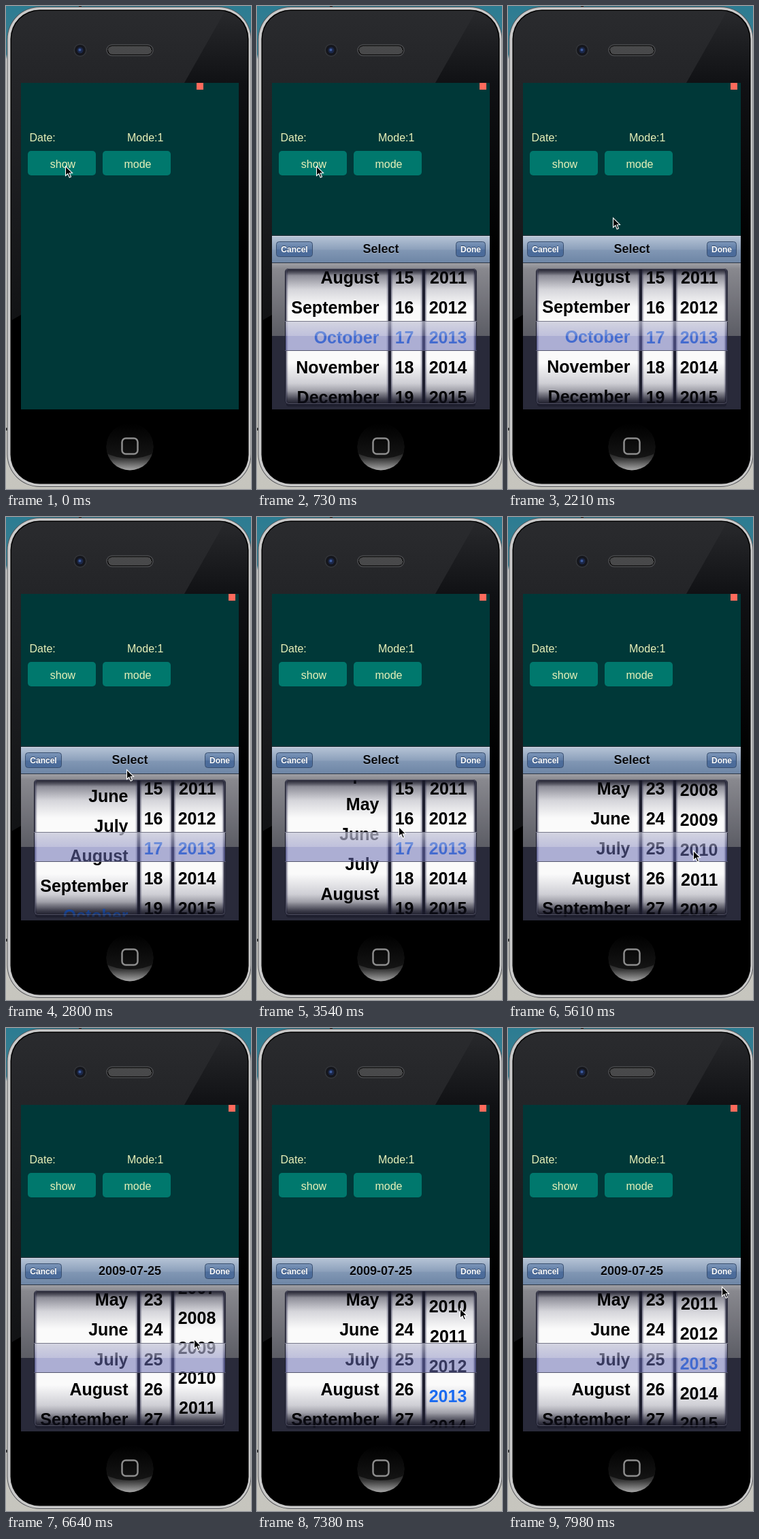
An HTML page with a canvas for the animation above (8 s loop, 360 by 710 pixels).

```html
<!DOCTYPE html>
<html>
<head>
<meta charset="utf-8">
<style>
html, body { margin: 0; width: 100%; height: 100%; overflow: hidden; background: #000; }
canvas { display: block; }
</style>
</head>
<body>
<canvas id="stage" width="360" height="710"></canvas>
<script>
const c = document.getElementById('stage').getContext('2d');
const LOOP = 8000, TICK = 147.6, LEAD = 16, ROW = 44, BASELINE = 495.5;
const SANS = '"Liberation Sans", Arial, sans-serif';
const MONTHS = ['January', 'February', 'March', 'April', 'May', 'June', 'July',
  'August', 'September', 'October', 'November', 'December'];

// Resting points of the pointer: [tick, x, y].
const stops = [[6, 87, 235], [11, 145, 440], [15, 154, 311], [24, 208, 455], [29, 218, 347],
  [31, 239, 444], [38, 272, 490], [43, 275, 465], [45, 276, 457], [54, 314, 380]];

function pointerAt(tick) {
  const i = stops.findIndex(s => s[0] > tick);
  if (i === 0) return stops[0].slice(1);
  if (i < 0) return stops[stops.length - 1].slice(1);
  const [t0, x0, y0] = stops[i - 1], [t1, x1, y1] = stops[i];
  const p = (tick - t0) / (t1 - t0), e = p * p * (3 - 2 * p);
  return [x0 + (x1 - x0) * e, y0 + (y1 - y0) * e];
}

// Fast start that coasts to rest.
function flick(tick, start, end, distance) {
  const p = Math.min(1, Math.max(0, (tick - start) / (end - start)));
  return distance * Math.sin(p * Math.PI / 2);
}

const squareX = t => 280 + flick(t, 0, 2, 47);
const slideY = t => 256 - flick(t, 3, 5, 256);
const monthDrag = t => flick(t, 9, 12, 60) - flick(t, 12, 15, 61) + flick(t, 15, 24, 156) - flick(t, 24, 27, 23);
const dayDrag = t => flick(t, 24.3, 34, -8 * ROW);
const yearDrag = t => flick(t, 33, 42, 4 * ROW) - flick(t, 44.3, 56, 4 * ROW);

function ramp(x0, y0, x1, y1, ...colors) {
  const g = c.createLinearGradient(x0, y0, x1, y1);
  for (const [p, color] of colors) g.addColorStop(p, color);
  return g;
}

function rect(x, y, w, h, fill) {
  c.fillStyle = fill;
  c.fillRect(x, y, w, h);
}

function round(x, y, w, h, r, fill, stroke, width = 1) {
  c.beginPath();
  c.roundRect(x, y, w, h, r);
  if (fill) { c.fillStyle = fill; c.fill(); }
  if (stroke) { c.strokeStyle = stroke; c.lineWidth = width; c.stroke(); }
}

function disc(x, y, r, fill) {
  c.beginPath();
  c.arc(x, y, r, 0, 7);
  c.fillStyle = fill;
  c.fill();
}

function poly(fill, ...points) {
  c.beginPath();
  points.forEach(p => c.lineTo(...p));
  c.closePath();
  c.fillStyle = fill;
  c.fill();
}

function text(s, x, y, font, fill, align = 'left') {
  c.font = font + ' ' + SANS;
  c.textAlign = align;
  c.fillStyle = fill;
  c.fillText(s, x, y);
}

function clipped(x, y, w, h, r, draw) {
  c.save();
  c.beginPath();
  c.roundRect(x, y, w, h, r);
  c.clip();
  draw();
  c.restore();
}

function drawPhone() {
  rect(0, 0, 360, 710, ramp(0, 0, 0, 710, [0, '#2c7c92'], [.1, '#3c7f92'], [.11, '#d4d4d2'], [1, '#c6c5be']));
  rect(107, 0, 4, 5, '#222');
  rect(0, 620, 360, 4, '#333');
  round(1.5, 1, 359, 706, 48, '#55565a');
  round(2.5, 2, 357, 704, 47, '#c9c9c9');
  round(6.5, 5.5, 350, 697, 43, '#000');
  clipped(8, 7, 347, 694, 42, () => {
    rect(8, 7, 347, 694, ramp(0, 7, 0, 600, [0, '#28292c'], [.18, '#101114'], [.6, '#000']));
    poly(ramp(0, 7, 0, 460, [0, '#2a2b2e'], [.25, '#232427'], [1, '#121315']),
      [8, 7], [322, 7], [262, 113], [22, 113], [22, 454], [8, 462]);
  });

  disc(109, 65, 9.5, '#34363a');
  disc(109, 65, 8, '#15161c');
  disc(109, 65, 4.5, '#1b2748');
  disc(108.5, 64.5, 2, '#3d5b9e');

  round(148, 57, 68, 16, 8, '#111', '#48494c', 1.5);
  clipped(150, 59, 64, 12, 6, () => {
    for (let y = 0; y < 6; y++)
      for (let x = 0; x < 32; x++) rect(150 + x * 2 + y % 2, 59 + y * 2, 1, 2, '#808184');
  });

  disc(182, 648, 34.5, ramp(0, 614, 0, 683, [0, '#000'], [.55, '#161616'], [.75, '#3a3a3a'], [1, '#aaa']));
  clipped(147.5, 613.5, 69, 69, 34.5, () => {
    c.beginPath();
    c.ellipse(182, 638, 50, 27, 0, 0, 7);
    c.fillStyle = ramp(0, 614, 0, 665, [0, '#000'], [1, '#151515']);
    c.fill();
  });
  round(170.5, 635.5, 23, 23, 5.5, null, '#8c8c8c', 2.5);
}

function drawApp(tick) {
  const cream = '#e8f0b8';
  rect(22, 113, 320, 480, '#003838');
  rect(Math.round(squareX(tick)), 113, 10, 10, '#ff6a5c');
  text('Date:', 34.5, 199, '16px', cream);
  text('Mode:1', 178, 199, '16px', cream);
  ['show', 'mode'].forEach((label, i) => {
    round(32 + i * 110, 213, 100, 36, 5, '#00786d');
    text(label, 83.5 + i * 110, 238, '16px', cream, 'center');
  });
}

function barButton(label, x, w) {
  round(x + .5, 346.5, w - 1, 22, 4,
    ramp(0, 346, 0, 369, [0, '#7f98ba'], [.5, '#5c7aa5'], [.51, '#4d6d9b'], [1, '#4a6a99']), '#3a5070');
  text(label, x + w / 2, 361, 'bold 12px', '#2f4667', 'center');
  text(label, x + w / 2, 362, 'bold 12px', '#fff', 'center');
}

function drawBar(title) {
  rect(22, 337, 320, 1, '#26303c');
  rect(22, 338, 320, 40, ramp(0, 338, 0, 378, [0, '#b6c4d6'], [.5, '#8ca0bb'], [.52, '#8197b4'], [1, '#6d85a5']));
  rect(22, 338, 320, 1, '#d3dce6');
  rect(22, 377, 320, 1, '#2c3644');
  barButton('Cancel', 28, 54);
  barButton('Done', 292, 44);
  text(title, 182, 364, 'bold 18px', 'rgba(255,255,255,.35)', 'center');
  text(title, 182, 363, 'bold 18px', '#080a0e', 'center');
}

function drawWheel(x, w, textRight, drag, today, label) {
  const edge = 'rgba(40,40,70,.55)', clear = 'rgba(40,40,70,0)';
  rect(x, 387, w, 197, ramp(0, 387, 0, 584, [0, '#4c4c58'], [.05, '#90909a'], [.15, '#d5d5da'],
    [.28, '#fafafa'], [.7, '#fafafa'], [.85, '#cfcfd5'], [.95, '#7d7d88'], [1, '#3a3a47']));
  rect(x, 387, w, 197, ramp(x, 0, x + w, 0, [0, edge], [3 / w, clear], [1 - 3 / w, clear], [1, edge]));
  const middle = today - drag / ROW;
  clipped(x, 387, w, 201, 0, () => {
    for (let k = Math.floor(middle) - 3; k <= middle + 4; k++)
      text(label(k), textRight, BASELINE + (k - middle) * ROW, 'bold 25px',
        label(k) === label(today) ? '#1a6af0' : '#000', 'right');
  });
}

function drawPicker(tick) {
  drawBar(tick < 43 ? 'Select' : '2009-07-25');
  rect(22, 378, 320, 107, ramp(0, 378, 0, 485, [0, '#a0a0a5'], [.08, '#88888e'], [1, '#5c5d65']));
  rect(22, 485, 320, 108, '#292a3a');
  round(41, 386, 282, 199, 5, '#1d1e2e');
  clipped(43, 387, 278, 202, 4, () => {
    drawWheel(43, 150, 179.5, monthDrag(tick), 9, k => MONTHS[(k + 24) % 12]);
    drawWheel(197, 46, 230.5, dayDrag(tick), 17, k => String((k + 30) % 31 + 1));
    drawWheel(247, 73, 308.3, yearDrag(tick), 2013, String);
    // Soft shade over the rims of the wheels.
    rect(43, 387, 278, 9, ramp(0, 387, 0, 396, [0, 'rgba(20,20,35,.65)'], [1, 'rgba(20,20,35,0)']));
    rect(43, 566, 278, 23, ramp(0, 566, 0, 589, [0, 'rgba(20,20,35,0)'], [.78, 'rgba(20,20,35,.6)'], [1, 'rgba(32,33,48,.9)']));
  });
  round(42.5, 386.5, 279, 198, 4, null, 'rgba(130,130,150,.5)');

  // Glass bar over the chosen row.
  rect(42, 464, 280, 21, ramp(0, 464, 0, 485, [0, 'rgba(198,199,216,.72)'], [1, 'rgba(150,152,198,.58)']));
  rect(42, 485, 280, 22, 'rgba(104,108,178,.53)');
  rect(41, 463, 282, 1, '#77788a');
  rect(41, 506, 282, 1, '#55566e');
}

function drawPointer(x, y) {
  c.save();
  c.translate(Math.round(x) + .5, Math.round(y) + .5);
  poly('#000', [0, 0], [0, 14], [3.3, 11], [5.7, 16.5], [8, 15.5], [5.7, 10.2], [10, 10]);
  c.strokeStyle = '#fff';
  c.lineWidth = 1.1;
  c.stroke();
  c.restore();
}

function frame(now) {
  const tick = Math.floor((now % LOOP + LEAD) / TICK);
  drawPhone();
  drawApp(tick);
  if (tick > 3) clipped(22, 113, 320, 480, 0, () => {
    c.translate(0, Math.round(slideY(tick)));
    drawPicker(tick);
  });
  drawPointer(...pointerAt(tick));
  requestAnimationFrame(frame);
}
requestAnimationFrame(frame);
</script>
</body>
</html>
```
